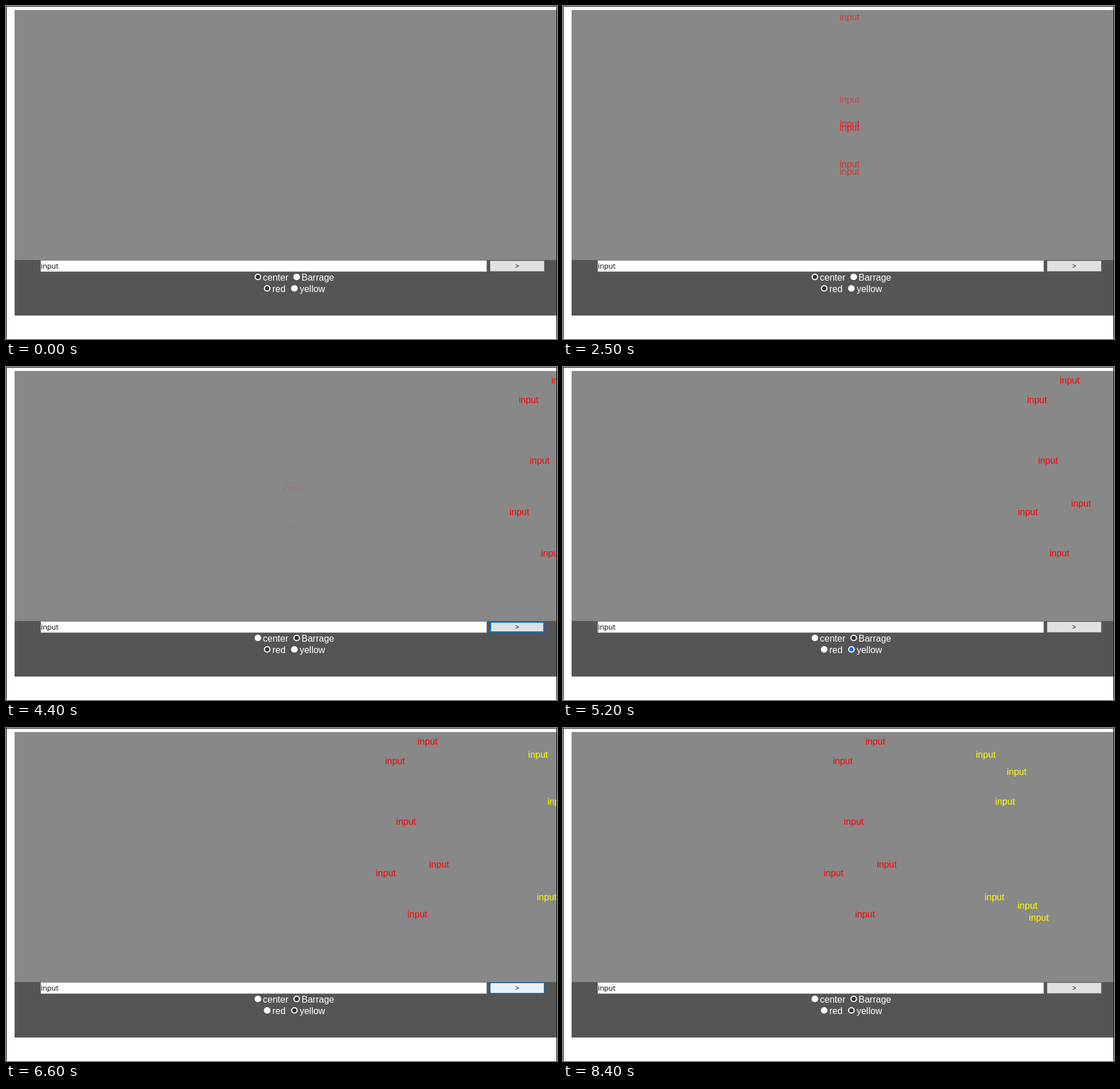
Animation of 962 by 582 pixels, one loop 8.5 s. Source, as an HTML page:

```html
<!DOCTYPE html>
<html lang="en">
<head>
<meta charset="utf-8">
<title>Comment barrage</title>
<style>
  html, body { margin: 0; width: 100%; height: 100%; overflow: hidden; background: #fff; }
  svg { display: block; width: 962px; height: 582px; }
  text { font: 16px "Liberation Sans", Arial, sans-serif; }
  .label { fill: #fff; }
  .field { font: 12.5px "Open Sans", "Noto Sans", sans-serif; fill: #000; }
  .red { fill: #f00; }
  .yellow { fill: #ff0; }

  .fade { opacity: 0; animation: fade 8.5s infinite; }
  .fly { animation: fly 8.5s steps(85) infinite; }
  @keyframes fade {
    0% { opacity: 1; animation-timing-function: cubic-bezier(.37, 0, .63, 1); }
    43.5%, 100% { opacity: 0; }
  }
  /* 106 px per second */
  @keyframes fly { to { transform: translateX(-901px); } }

  .ring { fill: #fff; }
  .dot { fill: #333; animation: 8.5s step-end infinite; }
  #center { animation-name: center; }
  #barrage { animation-name: barrage; }
  #redDot { animation-name: redDot; }
  #yellowDot { animation-name: yellowDot; }
  @keyframes center { 0% { opacity: 1; } 31.76%, 100% { opacity: 0; } }
  @keyframes barrage {
    0% { opacity: 0; fill: #0078d7; }
    31.76% { opacity: 1; fill: #0078d7; }
    34.11%, 100% { opacity: 1; fill: #333; }
  }
  @keyframes redDot { 0% { opacity: 1; } 57.64%, 100% { opacity: 0; } }
  @keyframes yellowDot {
    0% { opacity: 0; fill: #0078d7; }
    57.64% { opacity: 1; fill: #0078d7; }
    63.52%, 100% { opacity: 1; fill: #333; }
  }
</style>
</head>
<body>
<svg viewBox="0 0 962 582">
  <rect x="15" y="7" width="946" height="437" fill="#888"/>
  <g id="comments"></g>
  <rect x="15" y="444" width="946" height="97" fill="#555"/>

  <rect x="60.5" y="444.5" width="779" height="20" fill="#fff" stroke="#7a7a7a"/>
  <text class="field" x="61" y="459">input</text>

  <rect x="845" y="445" width="95" height="19" id="edge" fill="#adadad"/>
  <rect x="846" y="446" width="93" height="17" id="face" fill="#e1e1e1"/>
  <text class="field" x="892.5" y="459" text-anchor="middle" id="arrow">&gt;</text>

  <circle class="ring" cx="439.8" cy="473.5" r="5.8"/>
  <circle class="dot" id="center" cx="439.8" cy="473.5" r="3.8"/>
  <text class="label" x="448.5" y="480">center</text>
  <circle class="ring" cx="507.5" cy="473.5" r="5.8"/>
  <circle class="dot" id="barrage" cx="507.5" cy="473.5" r="3.8"/>
  <text class="label" x="516" y="480">Barrage</text>
  <circle class="ring" cx="456" cy="493.5" r="5.8"/>
  <circle class="dot" id="redDot" cx="456" cy="493.5" r="3.8"/>
  <text class="label" x="465" y="500">red</text>
  <circle class="ring" cx="503.5" cy="493.5" r="5.8"/>
  <circle class="dot" id="yellowDot" cx="503.5" cy="493.5" r="3.8"/>
  <text class="label" x="512.7" y="500">yellow</text>

  <path d="M.5 582V.5H961.5V582" fill="none" stroke="#000"/>
</svg>
<script>
  const LOOP = 8500;
  const $ = id => document.getElementById(id);

  function comment(x, y, cls, delay = 0) {
    const el = document.createElementNS("http://www.w3.org/2000/svg", "text");
    el.textContent = "input";
    el.setAttribute("x", x);
    el.setAttribute("y", y);
    el.setAttribute("class", cls);
    el.style.animationDelay = delay + "ms";
    $("comments").append(el);
  }

  // Centred comments: [baseline, time shown]
  [[169, 600], [25, 800], [295, 900], [282, 1100], [211, 1300], [218, 1500]]
    .forEach(([y, at]) => comment(483, y, "red fade", at));

  // Flying comments: [x near the end of the loop, baseline]
  const START = 890.4;
  const fly = (list, color) =>
    list.forEach(([x, y]) => comment(x - 1 + START, y, color + " fly"));
  fly([[456, 259], [472, 63], [491.3, 169], [511, 331], [529, 29], [549, 244]], "red");
  fly([[721.8, 52], [737, 301], [755.5, 134], [775.7, 82], [794.8, 316], [814.5, 337]], "yellow");

  // Button looks: [edge, face, edge width]
  const looks = {
    idle: ["#adadad", "#e1e1e1", 1],
    warm: ["#5793c2", "#e3e9ee", 1],
    hover: ["#0078d7", "#e5f1fb", 1],
    press: ["#005499", "#cce4f7", 1],
    focus: ["#0078d7", "#e1e1e1", 2]
  };
  const states = [
    [0, "idle"], [200, "warm"], [300, "hover"], [1700, "focus"], [2300, "idle"],
    [3100, "warm"], [3200, "hover"], [4400, "focus"], [4800, "idle"],
    [5600, "warm"], [5700, "hover"], [7000, "focus"], [8000, "idle"]
  ];
  const presses = [500, 700, 1000, 1200, 3300, 3500, 3700, 3900, 4000, 4200,
                   5800, 6000, 6200, 6300, 6500, 6700];
  presses.forEach(t => states.push([t, "press"], [t + 100, "hover"]));
  states.sort((a, b) => a[0] - b[0]);
  states.push([LOOP, "idle"]);

  const play = (id, style) => $(id).animate(
    states.map(([t, name]) => ({ offset: t / LOOP, easing: "step-end", ...style(looks[name], name) })),
    { duration: LOOP, iterations: Infinity });

  play("edge", look => ({ fill: look[0] }));
  play("face", look => ({ fill: look[1], clipPath: `inset(${look[2] - 1}px)` }));
  play("arrow", (look, name) => ({ transform: `translateX(${name === "press" ? 1 : 0}px)` }));
</script>
</body>
</html>
```
